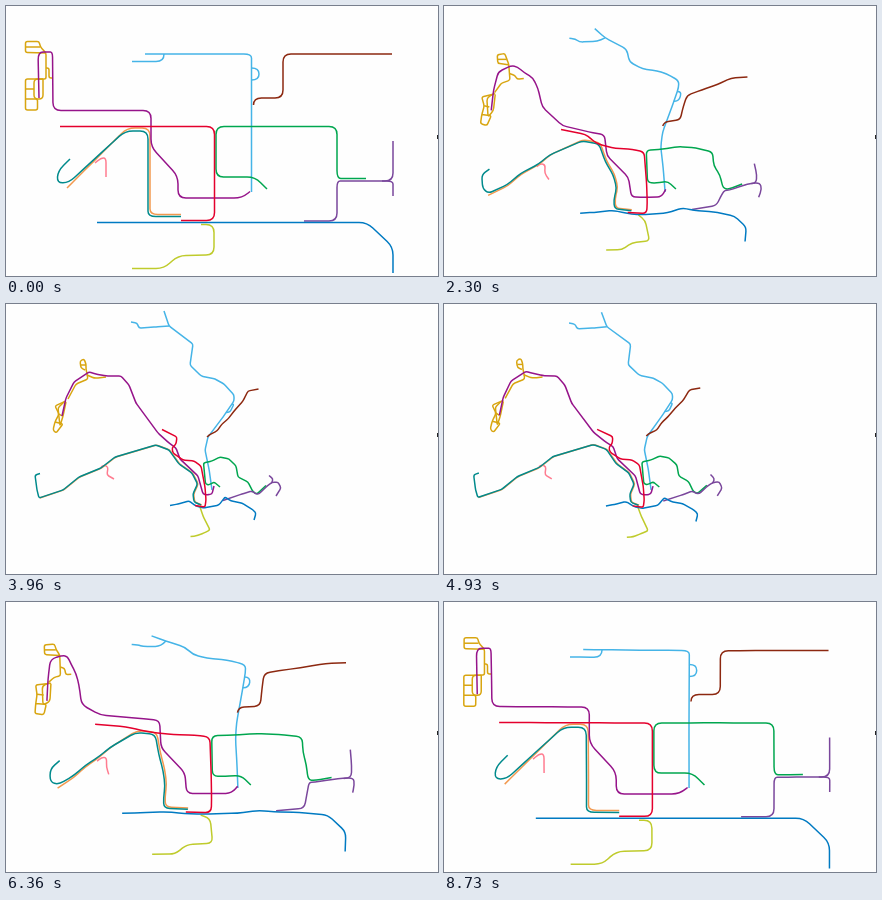
Write an HTML page that moves like this. It is 432 px wide and 270 px high and loops after 8760 ms.

```html
<!DOCTYPE html>
<html lang="en">
<head>
<meta charset="utf-8">
<title>Transit map morph</title>
<style>
  html, body { margin: 0; width: 100%; height: 100%; overflow: hidden; background: #fefefe; }
  svg { display: block; width: 432px; height: 270px; }
  path { fill: none; stroke-width: 1.5; stroke-linejoin: round; }
</style>
</head>
<body>
<svg id="map" viewBox="0 0 432 270">
  <rect x="431" y="129" width="1" height="4" fill="#222"/>
</svg>
<script>
const LOOP = 8760, HALF = 4000, MOVE = 3900, START = 183;
const map = document.getElementById('map');
const lines = [];

const mix = (a, b, p) => a + (b - a) * p;
const mixPoint = (a, b, p) => [mix(a[0], b[0], p), mix(a[1], b[1], p)];
const gap = (a, b) => Math.hypot(b[0] - a[0], b[1] - a[1]);
const points = text => text.split(',').map(s => s.trim().split(' ').map(Number));

// Each corner of the diagram matches the end of one "/" leg on the ground;
// bends inside a leg are spread over the straight piece by their distance.
function pair(corners, legs) {
  const stops = [[corners[0], legs[0][0]]];
  for (let k = 1; k < corners.length; k++) {
    let here = legs[k - 1].at(-1), sum = 0;
    const dist = legs[k].map(pt => {
      sum += gap(here, pt);
      here = pt;
      return sum;
    });
    legs[k].forEach((pt, i) =>
      stops.push([mixPoint(corners[k - 1], corners[k], dist[i] / sum), pt]));
  }
  return stops;
}

function line(color, diagram, ground, { radius = 8, nudge = 0 } = {}) {
  const legs = ground.split('/').map(points)
    .map(leg => leg.map(([x, y]) => [x + nudge, y]));
  const path = document.createElementNS('http://www.w3.org/2000/svg', 'path');
  path.setAttribute('stroke', color);
  map.append(path);
  lines.push({ path, radius, stops: pair(points(diagram), legs) });
}

const gold = '#d8a510', violet = '#7a479c', sky = '#45b4e7';
const tight = { radius: 2 };

line(gold, '40 47, 19.5 46.5, 19.5 35.5, 33 35.5, 34.5 41, 40 47, 40 73, 32 73',
  '79 66 / 75 64 / 74 57 / 78 55 / 80 60 / 80 65 / 82 75 / 70 80, 62 95', tight);
line(gold, '19.5 41, 34 41', '75 61 / 80 61');
line(gold, '40 62, 43 62, 43 72, 47 72', '81 71 / 88 74 / 92 74 / 100 73', tight);
line(gold, '37 73, 19.5 73, 19.5 104, 31.5 104, 31.5 93, 19.5 93',
  '60 97 / 49 102 / 53 110, 49 118, 47 126 / 50 129 / 57 120 / 49 118', tight);
line(gold, '19.5 83, 28 83', '53 110 / 56 112');
line(gold, '33 73, 28 73, 28 93, 37 93, 37 73',
  '58 98 / 52 104 / 54 122 / 57 112 / 60 98', { radius: 4 });

line('#ff7c90', '89 157, 95 152, 100 152, 100 171',
  '95 163 / 98 161 / 102 163 / 101 171, 108 175', { radius: 5 });

// Two services share the trunk.
const trunk = '33 194 / 57 186, 73 173, 95 164, 109 153, 150 141 / 163 146 / ' +
  '173 160, 186 169, 191.5 180, 187 190, 188 198 / 195 201';
line('#f2994f', '61 182, 121 122, 144 122, 144 208.5, 175 208.5', trunk, { nudge: 0.7 });
line('#008a8c', '64 153, 52 165, 51 177, 63 176.5, 119 125, 142 125, 142 210.5, 175 210.5',
  '34 169.5 / 29 171 / 31 186 / ' + trunk);

line(sky, '139 48, 158 48, 188 48, 245.5 48, 245.5 186',
  '158 7 / 163 22 / 187 40, 184 61 / 195 72, 209 75, 218 80, 228 91 / ' +
  '228 97, 217 113, 202 133, 199 146, 203 165, 206 186');
line(sky, '126 55.5, 158 55.5, 158 48', '125 18 / 131 19, 133 24, 150 23 / 163 22');
line(sky, '245.5 62, 253 62, 253 74, 245.5 74', '226 100 / 228 100 / 224 108 / 220 108.5');

line('#8c2810', '386 48, 277 48, 277 92, 247.5 92, 247.5 99',
  '252.5 85 / 242 87, 237 97, 229 106, 222 115 / 216 120, 211 127 / 203 131 / 201 133');

line('#bfcb2c', '195 218.5, 208 218.5, 208 249, 172 249.5, 158 262.5, 126 262.5',
  '194 203 / 197 212 / 204 226 / 198 229 / 190 232 / 184.5 232.5');

line('#96148a', '33 92, 32 46, 46.5 46, 47 104.5, 64 104.5, 145 104.5, 145 141, 172 170, ' +
  '172 192, 236 192, 244 185.5',
  '56 112 / 60 94, 68 78 / 83 68, 90 70 / 100 72, 115 72, 123 81, 130 99 / 152 129 / ' +
  '163 139, 170 144 / 174 155 / 192 172 / 197 190 / 201 191, 206 190 / 208 182');

line('#00a64f', '261 183, 249 171, 210 171, 210 120.5, 331 120.5, 331 172.5, 360 172.5',
  '214 183 / 208 178 / 203 181, 199.5 180 / 197.5 159 / 206 157, 214 153, 223 155, 230 162 / ' +
  '232 173, 242 178, 247 188 / 251 190, 260 181.5');

line(violet, '298 215, 331 215, 331 175, 387 175, 387 190',
  '217 196.5 / 236 190 / 246 187, 250 190 / 253 190, 261 182, 266 178.5, 272 178 / 275 184, 270 192');
line(violet, '387 135, 387 175, 376 175', '263 171.5 / 267 175, 266 178.5 / 265 179');

line('#007ac2', '91 216.5, 361 216.5, 387 241, 387 267',
  '164 201.5 / 172 200, 183 197, 190 202, 198 204, 213 201, 219 193, 225 197, 236 199, 247 206 / ' +
  '250 209 / 248 216');

line('#e4002d', '54 120.5, 208.5 120.5, 208.5 214.5, 175 214.5',
  '156 125.5 / 171 133, 170 140, 166 144, 167 149, 177 156, 188 157, 195 162 / ' +
  '199 183, 200 196, 199 203 / 189 201.5');

const ease = u => u < 0.5 ? 4 * u ** 3 : 1 - 4 * (1 - u) ** 3;

function progress(t) {
  const s = (t - START + 2 * HALF) % (2 * HALF);
  const e = ease(Math.min(1, (s % HALF) / MOVE));
  return s < HALF ? e : 1 - e;
}

// Point on the way from a to b, at most r away and within the given share.
const toward = (a, b, r, share) => mixPoint(a, b, Math.min(r / (gap(a, b) || 1), share));

const fmt = pt => pt.map(v => v.toFixed(2)).join(' ');

function rounded(pts, r) {
  const last = pts.length - 1;
  let d = 'M' + fmt(pts[0]);
  for (let i = 1; i < last; i++) {
    const before = toward(pts[i], pts[i - 1], r, i === 1 ? 1 : 0.5);
    const after = toward(pts[i], pts[i + 1], r, i === last - 1 ? 1 : 0.5);
    d += `L${fmt(before)}Q${fmt(pts[i])} ${fmt(after)}`;
  }
  return d + 'L' + fmt(pts[last]);
}

function draw(now) {
  const p = progress(now % LOOP);
  for (const { path, radius, stops } of lines) {
    const pts = stops.map(([a, b]) => mixPoint(a, b, p));
    path.setAttribute('d', rounded(pts, mix(radius, 2, p)));
  }
}

const begin = performance.now();
function tick() {
  draw(performance.now() - begin);
  requestAnimationFrame(tick);
}
tick();
</script>
</body>
</html>
```
